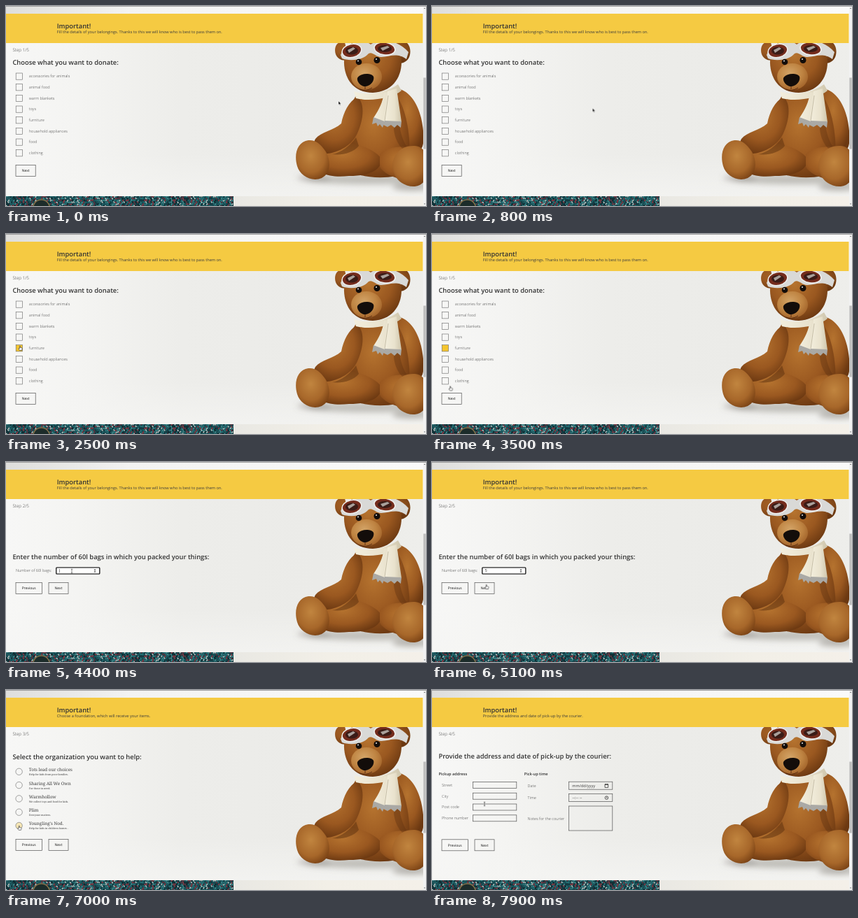
Write an HTML page that moves like this. It is 600 px wide and 286 px high and loops after 8 s.

```html
<!DOCTYPE html>
<html lang="en">
<head>
<meta charset="utf-8">
<title>Donation form</title>
<style>
  html, body { margin: 0; width: 100%; height: 100%; overflow: hidden; background: #fff; }
  svg { display: block; width: 600px; height: 286px; }
  text { font: 300 5.625px "Open Sans", sans-serif; fill: #3c3c3c; text-rendering: geometricPrecision; white-space: pre; }
  .h { font-size: 9.375px; font-weight: 600; fill: #333; }
  .b { font-weight: 600; fill: #333; }
  .n { font-weight: 400; fill: #3c3c3c; }
  .step { font-size: 6.25px; }
  .btn { font-size: 5px; font-weight: 400; fill: #111; text-anchor: middle; }
  .org { font: 300 6.25px "Noto Serif", serif; fill: #3c3c3c; }
  .sub { font: 300 3.6px "Noto Serif", serif; fill: #3c3c3c; }
  .box { fill: none; stroke: #666; stroke-width: .6; }
  .in { fill: none; stroke: #555; stroke-width: .7; }
  .focus { fill: #fff; stroke: #101010; stroke-width: 1.2; }
</style>
</head>
<body>
<svg viewBox="0 0 600 286">
  <defs>
    <linearGradient id="top"><stop stop-color="#dededc"/><stop offset=".3" stop-color="#f3f3f2"/><stop offset="1" stop-color="#fafafa"/></linearGradient>
    <linearGradient id="wall">
      <stop stop-color="#f7f7f6"/><stop offset=".17" stop-color="#f4f4f2"/>
      <stop offset=".42" stop-color="#ededea"/><stop offset=".75" stop-color="#ebebe8"/><stop offset="1" stop-color="#eeeeeb"/>
    </linearGradient>
    <linearGradient id="floor" x2="0" y2="1"><stop offset=".72" stop-color="#f5f5f3" stop-opacity="0"/><stop offset="1" stop-color="#f5f5f3" stop-opacity=".7"/></linearGradient>
    <linearGradient id="cream"><stop stop-color="#e9e8e3"/><stop offset=".5" stop-color="#f2efe7"/><stop offset="1" stop-color="#f4f0e9"/></linearGradient>
    <radialGradient id="fur" cx=".42" cy=".35" r=".68"><stop stop-color="#b5732f"/><stop offset=".6" stop-color="#9a5820"/><stop offset="1" stop-color="#6b3811"/></radialGradient>
    <radialGradient id="sole" cx=".45" cy=".4" r=".65"><stop stop-color="#c1853f"/><stop offset=".65" stop-color="#a7672a"/><stop offset="1" stop-color="#7b4315"/></radialGradient>
    <radialGradient id="muzzle" cx=".42" cy=".38" r=".66"><stop stop-color="#d3a467"/><stop offset=".6" stop-color="#bf8442"/><stop offset="1" stop-color="#a2632a"/></radialGradient>
    <linearGradient id="wool"><stop stop-color="#f3eedd"/><stop offset=".6" stop-color="#e9e2cd"/><stop offset="1" stop-color="#cfc6ad"/></linearGradient>
    <filter id="soft" x="-30%" y="-60%" width="160%" height="220%"><feGaussianBlur stdDeviation="4"/></filter>
    <filter id="fuzz"><feGaussianBlur stdDeviation=".6"/></filter>
    <clipPath id="photo"><path d="M0 53H596V272H0z"/></clipPath>
    <clipPath id="strip"><path d="M0 272H325V286H0z"/></clipPath>
  </defs>

  <path fill="url(#top)" d="M0 0H596V11H0z"/>
  <path fill="#8a8a8a" d="M0 0H600V.7H0z"/>
  <path fill="#f5ca42" d="M0 11H595.5V53H0z"/>
  <path fill="url(#wall)" d="M0 53H596V272H0z"/>
  <path fill="url(#floor)" d="M0 53H596V272H0z"/>

  <g clip-path="url(#photo)">
    <g filter="url(#soft)" fill="#77706a">
      <ellipse cx="520" cy="248" rx="92" ry="7" opacity=".4"/>
      <ellipse cx="440" cy="246" rx="24" ry="4" opacity=".45"/>
      <ellipse cx="580" cy="259" rx="28" ry="5" opacity=".5"/>
    </g>
    <g filter="url(#fuzz)" fill="url(#fur)">
      <path d="M556 118C574 118 588 138 593 160C597 178 600 204 589 208C575 212 564 190 562 170z"/>
      <path d="M500 128C482 155 484 215 496 238C515 248 560 248 572 236C582 205 574 150 558 128z"/>
      <path d="M488 196C470 190 448 204 442 220C440 240 462 246 490 243C520 243 538 234 536 218C528 206 506 198 488 196z"/>
      <path d="M534 212C545 200 570 198 592 206L594 250C570 252 542 244 534 230z"/>
      <path d="M502 130C490 136 482 152 479 168C468 178 450 180 442 190C436 200 444 211 458 211C476 210 494 198 501 184C510 166 514 140 502 130z"/>
      <path fill="#5d300f" opacity=".5" d="M500 188C492 200 478 210 466 212C480 214 496 210 504 200z"/>
      <path fill="#5d300f" opacity=".4" d="M561 150C560 172 566 196 578 208C568 210 556 196 554 176z"/>
      <path fill="url(#sole)" d="M432 192C416 194 411 212 416 229C420 243 437 252 451 246C465 239 464 219 456 207C449 197 442 191 432 192z"/>
      <path fill="url(#sole)" d="M584 200C564 199 552 213 552 229C553 248 569 259 584 258C597 256 602 248 602 228C602 210 596 201 584 200z"/>
      <path d="M484 52C472 49 468 60 471 69C474 77 484 80 490 76zM556 52C570 44 580 56 577 70C574 82 562 84 556 80z"/>
      <path d="M483 82C482 58 498 44 522 43C548 43 565 58 565 80C565 104 550 123 524 124C498 124 484 106 483 82z"/>
      <ellipse fill="url(#muzzle)" cx="515" cy="101" rx="22" ry="19"/>
    </g>
    <path d="M478 70C486 50 512 47 521 55C536 44 562 50 575 66L572 76C558 66 548 73 536 73C528 73 524 65 518 68C510 78 490 79 480 75z" fill="#d9d9d7"/>
    <g stroke="#efefed" stroke-width="1.6">
      <ellipse cx="494" cy="64" rx="14" ry="9.5" fill="#742c1d" transform="rotate(-12 494 64)"/>
      <ellipse cx="541" cy="61" rx="15" ry="9" fill="#742c1d" transform="rotate(8 541 61)"/>
    </g>
    <g fill="#3a1c17"><ellipse cx="494" cy="64" rx="9" ry="5.5"/><ellipse cx="541" cy="61" rx="10" ry="5"/></g>
    <path d="M488 63L496 59L499 61L490 67zM535 60L545 57L548 59L538 64z" fill="#a9a09b"/>
    <g fill="#130d0a"><circle cx="504" cy="80" r="4.3"/><circle cx="530" cy="77.5" r="4.5"/>
      <path d="M502 103C505 96 522 95 525 101C527 108 519 115 513 115C507 115 501 109 502 103z"/></g>
    <g fill="#fff"><circle cx="503" cy="78.5" r=".9"/><circle cx="529" cy="76" r=".9"/></g>
    <path d="M513 115V119M505 119Q513 123 523 117" fill="none" stroke="#5b2f14" stroke-width="1"/>
    <path d="M497 122C512 128 540 126 560 112L565 121C552 132 520 137 500 132z" fill="url(#wool)"/>
    <path d="M540 124L555 122L549 146L541 166L525 160C533 148 538 138 540 124z" fill="url(#wool)"/>
    <path d="M545 122L558 118L565 166L540 166z" fill="url(#wool)"/>
    <path d="M525 159L541 165L538 174L534 169L531 172L529 167L523 169zM541 164L565 165L564 174L559 170L555 174L550 170L545 173L539 170z" fill="#aaa9a5"/>
    <path d="M546 128L541 164" stroke="#b9b099" stroke-width=".8"/>
  </g>

  <g id="knit" clip-path="url(#strip)"></g>
  <path fill="url(#cream)" d="M325 272H596V286H325z"/>
  <path fill="#f2f2f2" d="M596 1H600V286H596z"/>
  <path fill="#bdbdbd" d="M596.3 102.5H599.7V204.5H596.3z"/>
  <path fill="#555" d="M597 4L598 2.5L599 4zM597 282.5L598 284L599 282.5z"/>

  <text class="h" x="72.7" y="32">Important!</text>
  <g id="pages"></g>
  <g id="cursor">
    <path id="arrow" d="M0 0V5.2L1.2 4.1L2 5.9L2.9 5.5L2.1 3.8H3.7z" fill="#111" stroke="#fff" stroke-width=".4"/>
    <path id="hand" d="M-.6 -2.6Q0 -3.2 .5 -2.6V-.6L2.8 0Q3.4 .4 3.1 1.6L2.5 3.3H-.6L-2.2 .9Q-2 .1 -.6 .8z" fill="#fff" stroke="#222" stroke-width=".6"/>
    <path id="beam" d="M-1.2 -2.7H1.2M0 -2.7V2.7M-1.2 2.7H1.2" fill="none" stroke="#333" stroke-width=".6"/>
  </g>
</svg>
<script>
const LOOP = 8000;
const $ = id => document.getElementById(id);
const opts = { duration: LOOP, iterations: Infinity };

const text = (x, y, s, cls = '') => `<text class="${cls}" x="${x}" y="${y}">${s}</text>`;
const rect = (x, y, w, h, cls = 'in', extra = '') =>
  `<rect class="${cls}" x="${x}" y="${y}" width="${w}" height="${h}" ${extra}/>`;
const button = (x, y, w, s) => rect(x, y, w, 16, 'in') + text(x + w / 2, y + 9.8, s, 'btn');
const nav = y => button(14, y, 37.5, 'Previous') + button(61, y, 28, 'Next');
const page = (id, note, n, y, title, body) =>
  `<g id="${id}">${text(72.7, 39.3, note, 'n')}${text(9.4, 65.2, `Step ${n}/5`, 'step')}${text(9.4, y, title, 'h')}${body}</g>`;

const fill = 'Fill the details of your belongings. Thanks to this we will know who is best to pass them on.';
const goods = ['accessories for animals', 'animal food', 'warm blankets', 'toys', 'furniture', 'household appliances', 'food', 'clothing'];
const orgs = [
  ['Tots lead our choices', 'Help for kids from poor families.'],
  ['Sharing All We Own', 'For those in need.'],
  ['Warmhollow', 'We collect toys and food for kids.'],
  ['Plim', 'Everyone matters.'],
  ["Youngling's Nod.", 'Help for kids in children homes .']
];

const goodsList = goods.map((s, i) => {
  const y = 96 + i * 15.67;
  const mark = i === 4 ? rect(14.2, y, 9.2, 9.2, '', 'id="tick" fill="#f5c52e"') : '';
  return mark + rect(14.2, y, 9.2, 9.2, 'box') + text(32.8, y + 6.4, s);
}).join('');

const orgList = orgs.map(([name, about], i) => {
  const y = 116.8 + i * 19.3;
  const mark = i === 4 ? `<circle id="pick" cx="18.6" cy="${y}" r="4.6" fill="#f5ca42"/>` : '';
  return `${mark}<circle class="box" cx="18.6" cy="${y}" r="4.7"/>` +
    text(32.8, y - .6, name, 'org') + text(32.8, y + 5.4, about, 'sub');
}).join('');

const address = ['Street', 'City', 'Post code', 'Phone number'].map((s, i) =>
  text(14, 137.7 + i * 15.8, s) + rect(58.4, 131.4 + i * 15.8, 62.4, 9)).join('');

const bags = text(14, 157.4, 'Number of 60l bags:') +
  rect(71.8, 151, 62, 9) +
  `<g id="focus">${rect(71.8, 151, 62, 9, 'focus', 'rx="1"')}
    <path d="M125.6 155L127 153L128.4 155zM125.6 156.2L127 158.2L128.4 156.2z" fill="#444"/></g>
  <path id="caret" d="M76.4 153V158.2" stroke="#111" stroke-width=".5"/>
  <g id="typed">${text(75.6, 157.4, '5', 'n')}</g>`;

const pickup = text(9.4, 122.3, 'Pickup address', 'b') + text(131.8, 122.3, 'Pick-up time', 'b') + address +
  text(136.6, 139, 'Date') + rect(195.6, 131.2, 62.2, 11) + text(200.3, 138.9, 'mm/dd/yyyy', 'n') +
  text(136.6, 156, 'Time') + rect(195.6, 148.6, 62.2, 11) + text(200.5, 156, '--:-- --', 'n') +
  text(136.6, 185.7, 'Notes for the courier') + rect(195.6, 166, 62.2, 35) +
  `<g fill="none" stroke="#222" stroke-width=".7"><path d="M247 134.8H251.6V139.4H247zM247 135.4H251.6M248 134V135M250.6 134V135"/>
    <circle cx="249.4" cy="154.1" r="2.3"/><path d="M249.4 152.7V154.2L250.3 154.9"/></g>`;

$('pages').innerHTML =
  page('p1', fill, 1, 84.4, 'Choose what you want to donate:', goodsList + button(14, 227.6, 28.2, 'Next')) +
  page('p2', fill, 2, 139, 'Enter the number of 60l bags in which you packed your things:', bags + nav(172.6)) +
  page('p3', 'Choose a foundation, which will receive your items.', 3, 98.8, 'Select the organization you want to help:', orgList + nav(213.4)) +
  page('p4', 'Provide the address and date of pick-up by the courier.', 4, 98.2, 'Provide the address and date of pick-up by the courier:', pickup + nav(213.8));

// Knitted fabric: rows of slanted stitches with seeded colours
let seed = 11;
const rand = () => (seed = seed * 16807 % 2147483647) / 2147483647;
const yarn = ['#1d5a60', '#2d8085', '#14383f', '#4a9a9b', '#0e2429', '#a23440', '#c8cfcb', '#246a70', '#6e2f3c'];
let knit = rect(0, 272, 325, 14, '', 'fill="#17434a"');
for (let x = 0; x < 325; x += 2.4)
  for (let r = 0; r < 6; r++) {
    const y = 271 + r * 2.7 + rand(), lean = r % 2 ? 1.6 : -1.6;
    knit += `<path d="M${x.toFixed(1)} ${y.toFixed(1)}l${lean} 2.2" stroke="${yarn[rand() * yarn.length | 0]}" stroke-width="1.4"/>`;
  }
$('knit').innerHTML = knit + '<circle cx="50.5" cy="289" r="12" fill="#1c2c2a" stroke="#85724a" stroke-width="1.6"/>';

// Show an element only during the given [from, to] spans (ms)
function show(id, ...spans) {
  const keys = spans[0][0] > 0 ? [{ offset: 0, opacity: 0 }] : [];
  for (const [from, to] of spans) {
    keys.push({ offset: from / LOOP, opacity: 1 });
    if (to < LOOP) keys.push({ offset: to / LOOP, opacity: 0 });
  }
  keys.push({ offset: 1, opacity: 0 });
  $(id).animate(keys.map(k => ({ ...k, easing: 'steps(1)' })), opts);
}

show('p1', [0, 3900]);
show('p2', [3900, 5400]);
show('p3', [5400, 7700]);
show('p4', [7700, LOOP]);
show('tick', [2300, 3900]);
show('focus', [4300, 5200]);
show('caret', [4300, 4700]);
show('typed', [4700, 5400]);
show('arrow', [0, 1700], [2900, 3500], [3900, 4200], [4800, 5100], [5400, 6700], [7200, 7400], [7700, 7800]);
show('hand', [1700, 2900], [3500, 3900], [5100, 5400], [6700, 7200], [7400, 7700]);
show('beam', [4200, 4800], [7800, LOOP]);

$('pick').animate([
  { offset: 0, opacity: 0 }, { offset: 6900 / LOOP, opacity: 0 },
  { offset: 7000 / LOOP, opacity: .35 }, { offset: 7200 / LOOP, opacity: 1 }, { offset: 1, opacity: 1 }
], opts);

// Pointer path: time, x, y; moves in 100 ms ticks
const path = [
  [0, 475, 136], [100, 475, 136], [1300, 54, 153.5], [1700, 23, 163], [2000, 20, 163], [2800, 20, 163],
  [3700, 28, 237], [3800, 28, 237], [4400, 94, 156], [4500, 94, 156], [5200, 75, 182], [5300, 75, 182],
  [5800, 109, 172.5], [6200, 62, 188], [6800, 18.8, 197], [7100, 18.8, 197], [7500, 75, 223], [7600, 75, 223],
  [7900, 75, 163], [8000, 75, 163]
];
$('cursor').animate(path.map(([t, x, y], i) => ({
  offset: t / LOOP,
  transform: `translate(${x}px, ${y}px)`,
  easing: path[i + 1] ? `steps(${(path[i + 1][0] - t) / 100})` : 'linear'
})), opts);
</script>
</body>
</html>
```
